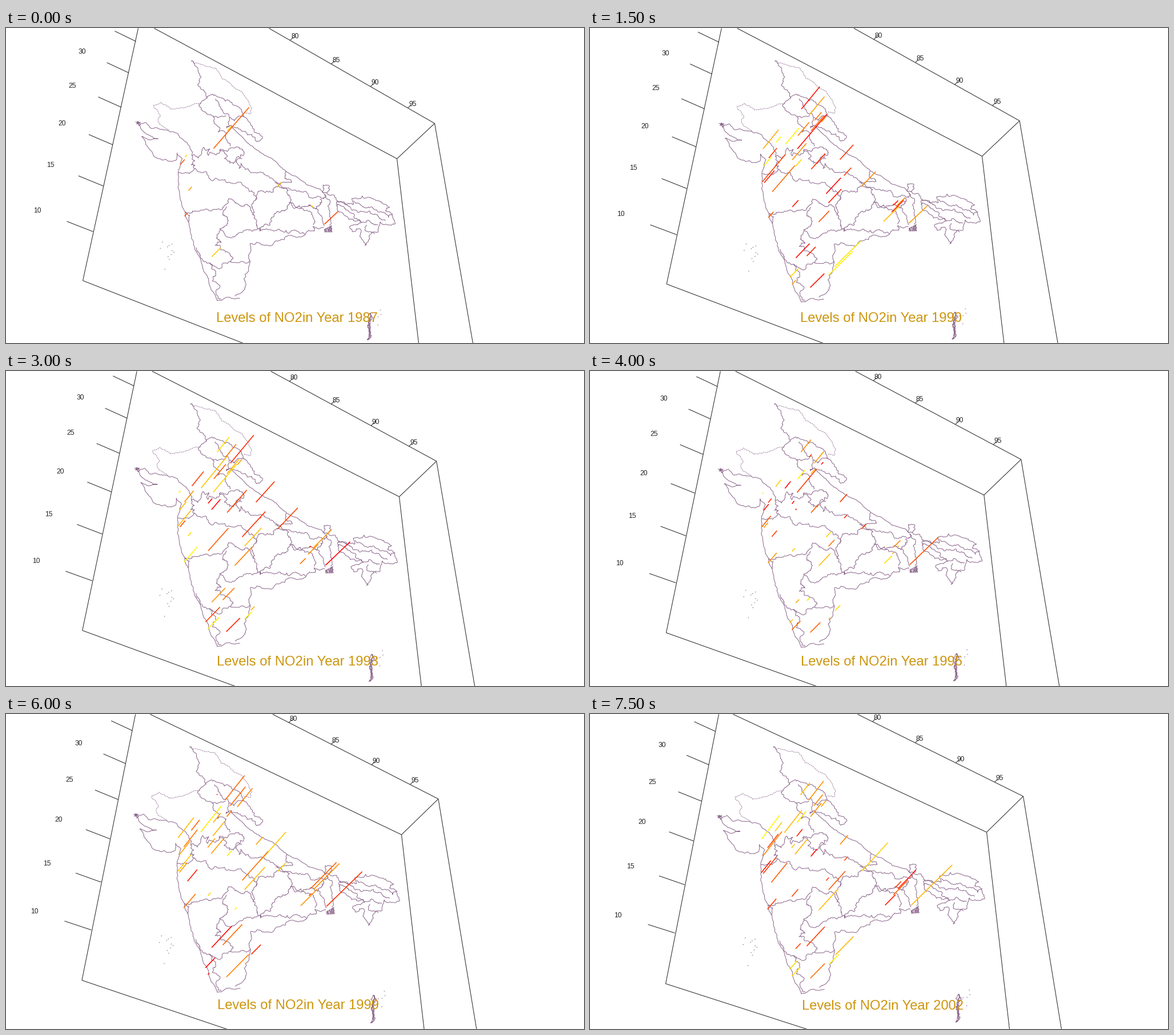
These frames come from a looping animation (1012x553 px, 8 s). A matplotlib script:

```python
import numpy as np
import matplotlib.pyplot as plt
from matplotlib.animation import FuncAnimation
from matplotlib.collections import LineCollection

W, H, DPI = 1012, 553, 64
FRAMES, STEP, START = 16, 500, 1987
PT = 72 / DPI  # points per pixel
INK, PLUM, GOLD = "#222222", "#8b668b", "#cd950c"
rng = np.random.default_rng(7)


def pts(*xy):
    return np.array(xy, float).reshape(-1, 2)


def lerp(a, b, t):
    return a + (b - a) * t


def receding(p, q, n, w):
    """n points from p to q, evenly spaced in depth; w is the perspective ratio."""
    u = np.linspace(0, 1, n)[:, None]
    return lerp(p, q, u * w / (1 - u + u * w))


# ---- the view turns slowly: the map plane at the first and last step ----
PLANE_A = pts(324, 57, 229, 165, 368, 478, 681, 343, 134, 443, 684, 229, 633, 547)
PLANE_B = pts(321, 56, 223, 180, 369, 491, 691, 318, 132, 473, 694, 207, 640, 542)
APEX_A, APEX_B = pts(-1061, 1868)[0], pts(-834, 1711)[0]  # where all bars converge


def fit_plane(src, dst):
    rows, rhs = [], []
    for (x, y), (u, v) in zip(src / 500, dst / 500):
        rows += [(x, y, 1, 0, 0, 0, -u * x, -u * y), (0, 0, 0, x, y, 1, -v * x, -v * y)]
        rhs += [u, v]
    h = np.linalg.lstsq(np.array(rows), np.array(rhs), rcond=None)[0]
    return np.append(h, 1).reshape(3, 3)


PLANE = fit_plane(PLANE_A, PLANE_B)


def turned(p):
    q = np.column_stack([p / 500, np.ones(len(p))]) @ PLANE.T
    return q[:, :2] / q[:, 2:] * 500


# ---- frame box, ticks and their labels ----
def frame_box(left, base, base_end, top, corner, right_end, back_top, back, back_end):
    path = [(left, base), (base, base_end), (top, corner), (corner, right_end),
            (corner, back), (back_top, back), (back, back_end)]
    return np.array(path, float)


def ticks(lat_first, lat_last, lon_first, lon_last):
    lat_in, lat_out = (receding(lat_first[i], lat_last[i], 6, .793) for i in (0, 1))
    lon_in = receding(lon_first, lon_last, 4, 1.075)
    inner = np.vstack([lat_in, lon_in])
    outer = np.vstack([lat_out, lon_in + (5.7, -5.2)])
    reach = np.repeat([2.12, 1.45], [6, 4])[:, None]
    return np.stack([inner, outer], axis=1), lerp(inner, outer, reach)


BOX_A = frame_box((231, 0), (134, 443), (415, 553), (259, 0), (684, 229), (722, 553),
                  (460, 0), (750, 167), (817, 553))
BOX_B = frame_box((225, 0), (132, 473), (380, 553), (250, 0), (694, 207), (734, 553),
                  (468, 0), (758, 144), (825, 553))
TICKS_A, SPOTS_A = ticks(pts(227, 23, 190, 5), pts(152, 357, 106, 339), pts(497, 21), pts(703, 140))
TICKS_B, SPOTS_B = ticks(pts(219, 30, 182, 13), pts(148, 384, 101, 369), pts(494, 13), pts(708, 119))
DEGREES = [*range(35, 5, -5), *range(80, 100, 5)]

# ---- state borders: a few key points, made ragged by midpoint displacement ----
solid, faint = [], []


def border(*xy, group=solid, amp=.16):
    p = pts(*xy)
    while len(p) < 2 or np.abs(np.diff(p, axis=0)).max() > 3:
        d = np.diff(p, axis=0)
        normal = np.column_stack([-d[:, 1], d[:, 0]])
        mid = p[:-1] + d / 2 + normal * rng.normal(0, amp, (len(d), 1))
        out = np.empty((2 * len(p) - 1, 2))
        out[::2], out[1::2] = p, mid
        p = out
    group.append((p, turned(p)))


# northern states
border(324, 57, 350, 67, 367, 70, 378, 89, 398, 103, 416, 117, 428, 150, 416, 147,
       group=faint, amp=.1)
border(324, 57, 341, 85, 335, 99, 346, 110, 352, 123)
border(341, 131, 349, 124, 373, 121, 395, 130, 412, 143, 416, 155)
border(366, 124, 376, 140, 391, 157, 386, 175, 393, 170)
border(341, 131, 338, 137, 356, 152, 370, 157, 385, 154)
border(362, 155, 366, 168, 386, 184, 384, 192, 392, 207)
border(391, 157, 400, 162, 416, 155, 428, 170, 448, 190, 438, 199, 416, 181, 393, 170)
border(393, 172, 420, 199, 452, 223, 500, 258, 525, 274, 556, 290, amp=.07)
# Rajasthan and Gujarat
border(341, 131, 316, 138, 288, 142, 271, 130, 258, 135, 270, 153, 266, 158, 284, 180,
       group=faint, amp=.09)
border(229, 165, 254, 176, 287, 182, 302, 188, 322, 212, 326, 217, 325, 224, amp=.1)
border(229, 165, 236, 177, 254, 190, 266, 194, 250, 196, 237, 190, 252, 214, 268, 229,
       290, 234, 298, 231, 299, 219, 308, 229, 301, 251, amp=.08)
border(226, 164, 235, 165, 228, 168, 235, 169, 229, 165, amp=.3)
border(325, 224, 336, 228, 345, 209, 356, 212, 354, 223, 368, 222, 375, 212, 398, 210,
       412, 212, 416, 222, 402, 232, 382, 229, 373, 214, amp=.2)
border(325, 224, 330, 233, 324, 240, 330, 246, 316, 254, 301, 253, amp=.22)
# coasts
border(301, 251, 303, 288, 313, 322, 319, 340, 327, 373, 341, 407, 351, 433, 359, 460,
       369, 478, 376, 478, 389, 472, 409, 474, amp=.06)
border(400, 470, 417, 459, 416, 440, 427, 411, 424, 398, 427, 378, 449, 380, 480, 372,
       523, 362, 539, 356, 537, 348, 556, 350, amp=.1)
# central states
border(330, 246, 345, 253, 358, 266, 390, 270, 425, 286, 438, 296, 436, 302)
border(413, 229, 402, 235, 408, 246, 411, 237, 438, 254, 460, 260, 475, 272, 500, 270,
       490, 251)
border(436, 302, 468, 284, 490, 282, 498, 306, 488, 320, 470, 325, 452, 345, 444, 356,
       438, 344, 434, 322, 436, 302, amp=.2)
border(313, 322, 345, 319, 377, 318, 387, 308, 398, 303, 413, 313, 426, 313, 434, 328)
border(386, 313, 379, 328, 387, 333, 374, 352, 408, 359, 440, 353)
border(444, 356, 468, 356, 495, 360, 523, 362)
# southern states
border(313, 324, 321, 328, 320, 340)
border(374, 352, 368, 368, 376, 376, 366, 381, 387, 393, 397, 404, 383, 412, 355, 412,
       340, 398, 332, 385, amp=.2)
border(392, 410, 412, 409, 427, 408)
border(355, 412, 367, 428, 362, 436, 370, 458, 376, 476)
# eastern states
border(498, 306, 518, 316, 540, 338, 537, 345)
border(470, 271, 482, 278, 508, 286, 530, 297, 556, 299, 558, 291)
border(498, 306, 520, 313, 532, 311, 541, 317, 552, 306, 549, 300, amp=.2)
border(541, 317, 553, 332, 557, 347)
border(556, 291, 567, 306, 563, 312, 566, 331, 566, 346)
border(555, 275, 565, 276, 566, 284, 560, 289, 553, 287, 555, 275)
# north-east
border(560, 289, 580, 303, 608, 309, 605, 299, 642, 299, 671, 314, 664, 320, 681, 343,
       655, 340, 652, 350, 637, 362, 628, 381, 621, 368, 613, 352, 606, 357, 601, 348,
       622, 341, 604, 335, 580, 320, 580, 303)
border(608, 303, 625, 314, 650, 322, 677, 326)
border(580, 306, 620, 321, 645, 326, 664, 338)
border(578, 312, 600, 322, 622, 341, 640, 342, 651, 345)
border(630, 345, 628, 355, 645, 361)
# river delta, island chain and scattered islets
for x in range(557, 571):
    border(x, 353 - (x - 556) * .5, x + .5, 358)
for _ in range(2):
    border(637, 500, 634, 515, 637, 527, 632, 547, 635, 530, 637, 514, 637, 500, amp=.2)
for (x, y), (sx, sy), n in [((280, 393), (9, 13), 11), ((649, 510), (5, 15), 6)]:
    for dx, dy in rng.normal(0, 1, (n, 2)):
        border(x + dx * sx, y + dy * sy, x + dx * sx + 1.4, y + dy * sy - 1)

# ---- measuring stations; the earliest come first ----
HUBS = pts(363, 211, 557, 344)
HUB_REACH = pts(62, 10, 24, 72)  # first and last reach of each hub
CITIES = pts(387, 180, 313, 226, 305, 239, 319, 285, 312, 330, 360, 401, 474, 279, 530, 312,
             535, 314, 370, 142, 384, 152, 405, 165, 393, 162, 364, 188, 354, 230, 303, 210,
             302, 267, 305, 269, 360, 241, 387, 247, 437, 231, 444, 259, 413, 290, 417, 306,
             400, 339, 513, 340, 379, 398, 428, 417, 417, 432, 349, 435, 353, 447, 326, 199,
             342, 203, 354, 312, 385, 453, 527, 324)
SITES_A = np.vstack([HUBS, CITIES])
SITES_B = turned(SITES_A)


def readings(year):
    """Reach in pixels and colour of every bar; the mean swings over nine years."""
    r = np.random.default_rng(year)
    mean = 16 + 9 * np.cos(2 * np.pi * (year - 1991.5) / 9)
    age = year - START
    hubs = lerp(HUB_REACH[:, 0], HUB_REACH[:, 1], age / (FRAMES - 1))
    cities = mean * np.minimum(r.gamma(2.2, .45, len(CITIES)), 2.2)
    cities[9 + 12 * age:] = 0
    warmth = r.random(len(SITES_A))
    return np.append(hubs, cities), [(1, g, 0) for g in warmth]


# ---- figure ----
fig = plt.figure(figsize=(W / DPI, H / DPI), dpi=DPI, facecolor="white")
ax = fig.add_axes([0, 0, 1, 1])
ax.set_xlim(-.5, W - .5)
ax.set_ylim(H - .5, -.5)
ax.axis("off")


def lines(px, z, **kw):
    return ax.add_collection(LineCollection([], linewidths=px * PT, zorder=z, **kw), autolim=False)


def label(text, px, color):
    return ax.text(0, 0, text, family="Liberation Sans", fontsize=px * PT, color=color,
                   ha="center", va="baseline", zorder=5)


box = lines(1, 1, colors=INK)
land = lines(1, 2, colors=PLUM)
edge = lines(.8, 2, colors=PLUM, linestyles=(0, (3, 1.3)))
bars = lines(1.6, 3)
marks = [label(str(d), 12, INK) for d in DEGREES]
title = label("", 23.7, GOLD)


def draw(i):
    t, year = i / (FRAMES - 1), START + i
    box.set_segments([*lerp(BOX_A, BOX_B, t), *lerp(TICKS_A, TICKS_B, t)])
    for coll, group in ((land, solid), (edge, faint)):
        coll.set_segments([lerp(a, b, t) for a, b in group])

    foot = lerp(SITES_A, SITES_B, t)
    away = foot - lerp(APEX_A, APEX_B, t)
    reach, colors = readings(year)
    bars.set_segments(np.stack([foot, foot + away / away[:, :1] * reach[:, None]], axis=1))
    bars.set_color(colors)
    bars.set_linewidth(np.where(reach > 0, 1.6 * PT, 0))

    for mark, (x, y) in zip(marks, lerp(SPOTS_A, SPOTS_B, t)):
        mark.set_position((x, y + 4.3))
    title.set_text(f"Levels of NO2in Year {year}")
    title.set_position((lerp(508.5, 512, t), lerp(515, 518.5, t)))
    return [box, land, edge, bars, title, *marks]


anim = FuncAnimation(fig, draw, frames=FRAMES, interval=STEP, repeat=True, repeat_delay=0)
plt.show()
```
